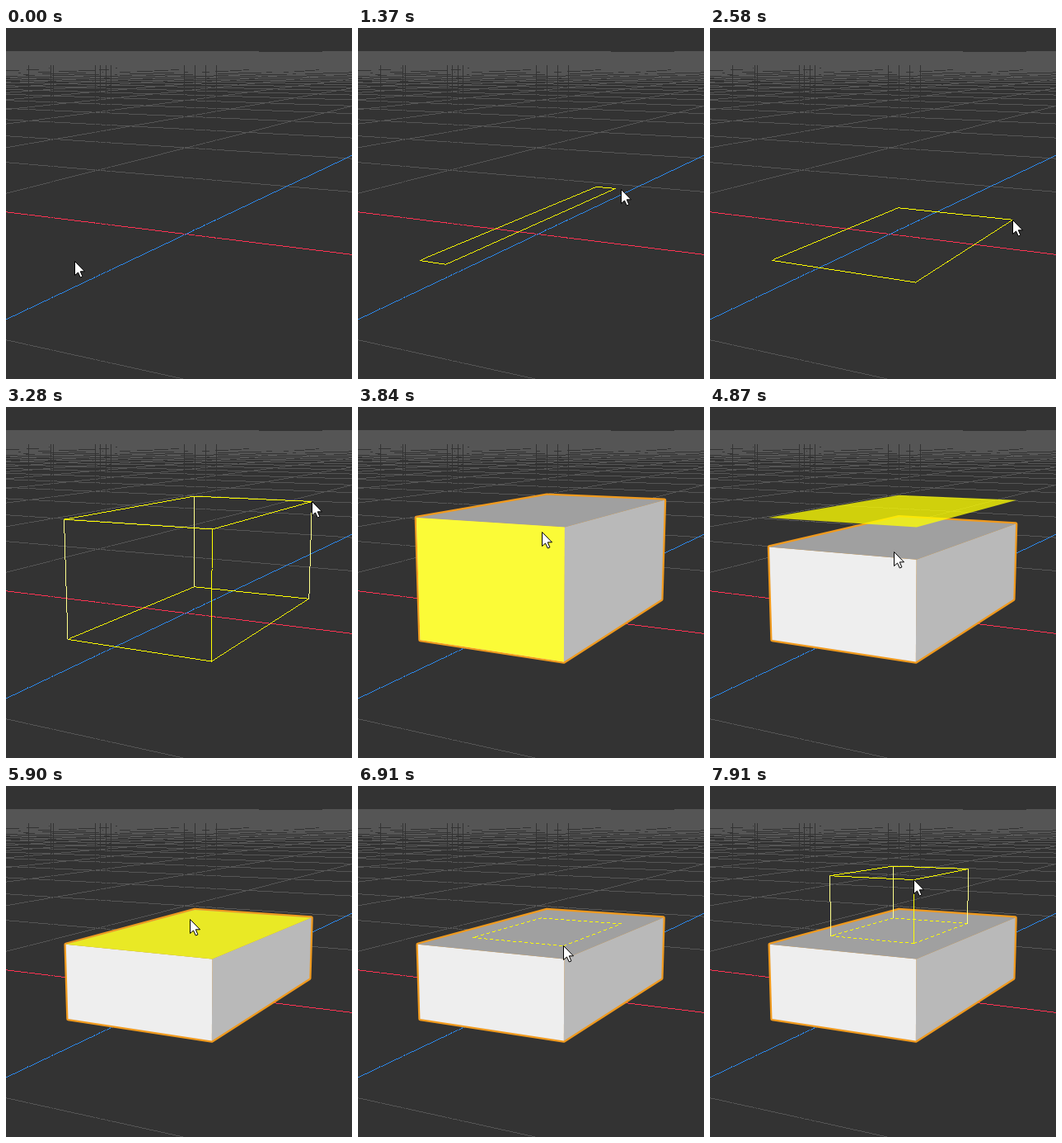
These frames come from a looping animation (420x425 px, 8 s). An HTML page with a canvas:

```html
<!DOCTYPE html>
<html>
<head>
<meta charset="utf-8">
<style>
html, body { margin: 0; height: 100%; overflow: hidden; background: #333; }
canvas { display: block; }
</style>
</head>
<body>
<canvas id="stage" width="420" height="425"></canvas>
<script>
const W = 420, H = 425, LOOP = 8000;
const canvas = document.getElementById('stage');
const ctx = canvas.getContext('2d');

// Three-point perspective: vanishing points of the red, blue and vertical axes.
const ORIGIN = [218, 249.6], RED_VP = [-1600, 26.3], BLUE_VP = [690, 26.3], DOWN_VP = [222, 5000];
const RED_STEP = 0.181, BLUE_STEP = 0.35;
const YELLOW = '#ffff00', PALE = '#ffff8c', ORANGE = '#f09a1e';
const HIGHLIGHT = 'rgba(255,255,0,.77)';

function project(u, v, z = 0) {
  const w = 1 + u + v - z;
  return [0, 1].map(i =>
    (ORIGIN[i] + u * RED_VP[i] + v * BLUE_VP[i] - z * DOWN_VP[i]) / w);
}

const progress = (t, start, end) => Math.min(1, Math.max(0, (t - start) / (end - start)));
const ease = (t, start, end) => {
  const k = progress(t, start, end);
  return k * k * (3 - 2 * k);
};
const mix = (a, b, k) => a + (b - a) * k;

// One-pixel line without smoothing.
function line(g, [x0, y0], [x1, y1], color, dashed) {
  const n = Math.max(1, Math.round(Math.max(Math.abs(x1 - x0), Math.abs(y1 - y0))));
  g.fillStyle = color;
  for (let i = 0; i <= n; i++) {
    if (dashed && i % 7 > 3) continue;
    g.fillRect(Math.floor(mix(x0, x1, i / n)), Math.floor(mix(y0, y1, i / n)), 1, 1);
  }
}

function makeFloor() {
  const floor = document.createElement('canvas');
  floor.width = W;
  floor.height = H;
  const g = floor.getContext('2d');
  const ruled = (p, vp, color) => {
    const slope = (p[1] - vp[1]) / (p[0] - vp[0]);
    const yAt = x => vp[1] + slope * (x - vp[0]);
    line(g, [0, yAt(0)], [W, yAt(W)], color);
  };
  g.fillStyle = '#333';
  g.fillRect(0, 0, W, H);
  for (let i = -1; i <= 60; i++) {
    ruled(project(0, i * BLUE_STEP), RED_VP, '#555');
    if (i > 0) ruled(project(i * RED_STEP, 0), BLUE_VP, '#555');
  }
  g.fillRect(0, 28, 307, 17);
  g.fillRect(307, 29, W - 307, 16);
  ruled(ORIGIN, RED_VP, '#ff3352');
  ruled(ORIGIN, BLUE_VP, '#2c88ee');
  return floor;
}
const floor = makeFloor();

// Corners in order: left, front, right, back.
function corners({ left, right, front, back }, z) {
  return [[left, front], [right, front], [right, back], [left, back]]
    .map(([u, v]) => project(u, v, z));
}

function polygon(points, color) {
  ctx.beginPath();
  points.forEach(p => ctx.lineTo(p[0] + 0.5, p[1] + 0.5));
  ctx.closePath();
  ctx.fillStyle = color;
  ctx.fill();
}

function wire(rect, z, height, dashed) {
  const base = corners(rect, z), top = corners(rect, z + height);
  const outline = (pts, dash) =>
    pts.forEach((p, i) => line(ctx, p, pts[(i + 1) % 4], YELLOW, dash));
  outline(base, dashed);
  if (height <= 0) return;
  base.forEach((p, i) => line(ctx, p, top[i], i === 1 ? YELLOW : PALE));
  outline(top);
}

function solid(rect, height, hover) {
  const [a, b, c] = corners(rect, 0);
  const top = corners(rect, height);
  const [ta, tb, tc, td] = top;
  const front = [a, b, tb, ta];
  polygon([a, b, c, tc, td, ta], ORANGE);
  ctx.strokeStyle = ORANGE;
  ctx.lineWidth = 4.5;
  ctx.lineJoin = 'round';
  ctx.stroke();
  polygon(front, '#eeeeee');
  polygon([b, c, tc, tb], '#b9b9b9');
  polygon(top, '#a0a0a0');
  if (hover === 'front') polygon(front, HIGHLIGHT);
  if (hover === 'top') polygon(top, HIGHLIGHT);
}

const arrow = new Path2D('M0 0V17L4 13.5L6.8 19.5L9.4 18.4L6.8 12.3H12Z');
function drawPointer([x, y]) {
  ctx.save();
  ctx.translate(Math.floor(x) + 0.5, Math.floor(y) + 0.5);
  ctx.lineWidth = 1;
  ctx.lineJoin = 'miter';
  ctx.fillStyle = '#fff';
  ctx.strokeStyle = '#000';
  ctx.fill(arrow);
  ctx.stroke(arrow);
  ctx.restore();
}

const FULL = 0.0266, LOW = 0.0164;
const BIG = { left: 0.0289, right: -0.0536, front: -0.1538, back: 0.1376 };
const SMALL = { left: 0.0137, right: -0.036, front: -0.085, back: 0.064 };

// The first drag runs far back, swings to the right, then settles.
function bigDrag(t) {
  const overshoot = 0.016 * Math.sin(Math.PI * progress(t, 1700, 2330));
  return {
    ...BIG,
    right: mix(BIG.left, BIG.right, ease(t, 1260, 1650)) - overshoot,
    back: BIG.front + 0.4698 * ease(t, 880, 1370) - 0.257 * ease(t, 1370, 1650)
      + 0.0786 * ease(t, 1700, 2330)
  };
}

// Pulled up once, then pushed down with a fading wobble.
function bigHeight(t) {
  const k = progress(t, 4270, 4960);
  const wobble = 0.0104 * Math.sin(3 * Math.PI * k) * Math.sqrt(1 - k);
  return mix(FULL * ease(t, 2580, 3340), LOW, ease(t, 4270, 4960)) + wobble;
}

// Drawn from the back corner, slightly too large at first.
function smallDrag(t) {
  const k = 1.2 * ease(t, 6080, 6350) - 0.2 * ease(t, 6540, 7180);
  return {
    ...SMALL,
    right: mix(SMALL.left, SMALL.right, k),
    front: mix(SMALL.back, SMALL.front, k)
  };
}
const smallHeight = t => 0.0136 * ease(t, 7560, 7910);

function pointerAt(t) {
  if (t < 880) return [mix(83, 76, ease(t, 310, 390)), 282];
  if (t < 3380) {
    const { right, back } = bigDrag(t + 20);
    return project(right, back, bigHeight(t));
  }
  if (t < 6080) {
    const toFront = ease(t, 3410, 3840);
    const pushed = FULL - bigHeight(t);
    return [
      371 - 148 * toFront,
      113 + 39 * toFront - 15 * ease(t, 3840, 4210) + 6130 * pushed - 38.5 * ease(t, 5110, 5900)
    ];
  }
  const { right, front } = smallDrag(t);
  return project(right, front, LOW + smallHeight(t));
}

function hoverAt(t) {
  if (t >= 3650 && t < 4050) return 'front';
  if ((t >= 3450 && t < 4270) || (t >= 5150 && t < 6080)) return 'top';
}

function draw(t) {
  ctx.drawImage(floor, 0, 0);
  const height = bigHeight(t);
  if (t >= 3360) solid(BIG, height, hoverAt(t));
  else if (t >= 880) wire(bigDrag(t), 0, height);
  // The starting face stays visible while the top is pushed down.
  if (t >= 4270 && t < 5110 && height < FULL) polygon(corners(BIG, FULL), HIGHLIGHT);
  if (t >= 6080) wire(smallDrag(t), LOW, smallHeight(t), true);
  drawPointer(pointerAt(t));
}

function tick() {
  draw(performance.now() % LOOP);
  requestAnimationFrame(tick);
}
tick();
</script>
</body>
</html>
```
